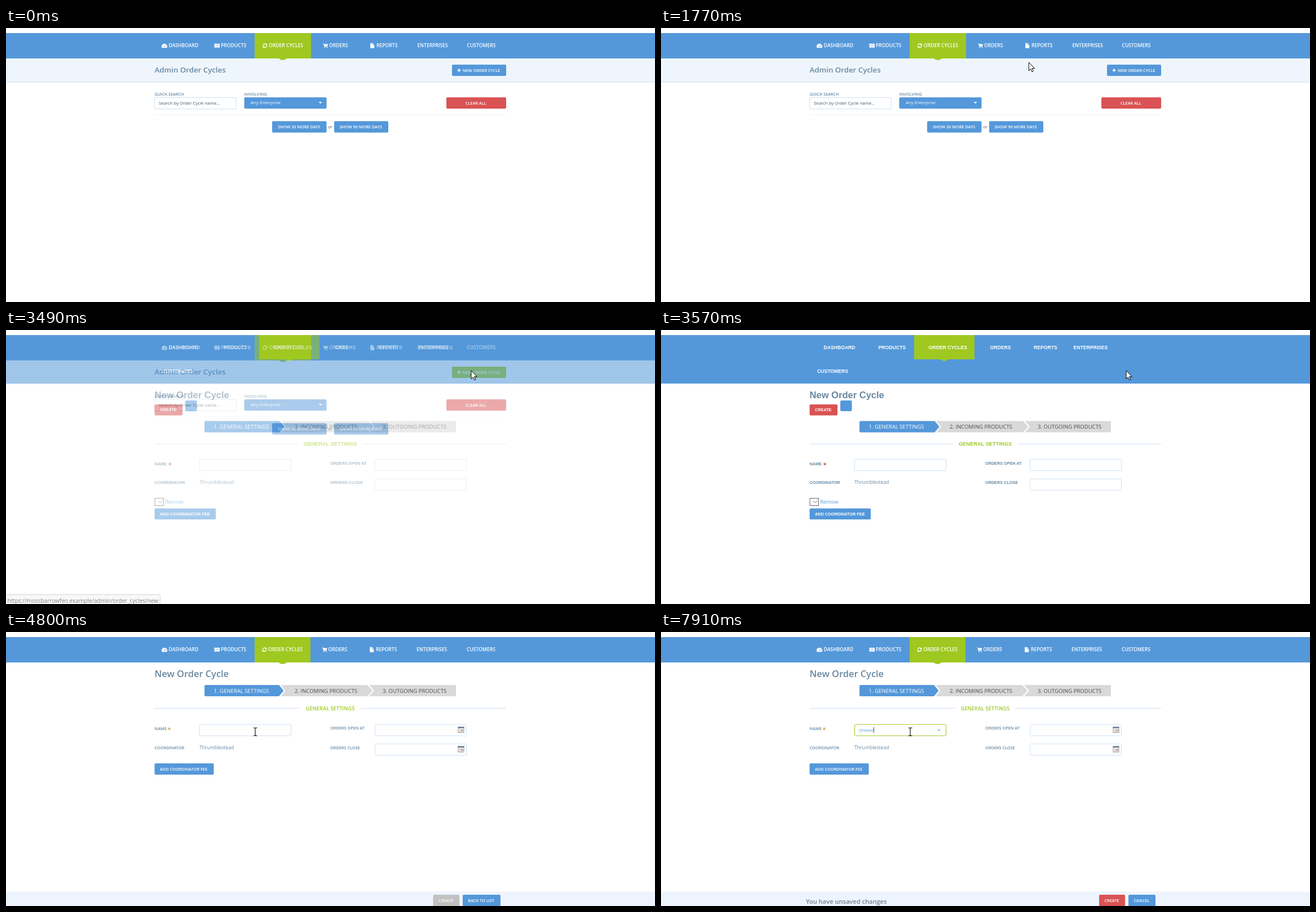
An HTML page for the animation above (7990 ms loop, 1151 by 486 pixels).

```html
<!DOCTYPE html>
<html lang="en">
<head>
<meta charset="utf-8">
<title>New order cycle</title>
<style>
  html, body { margin: 0; width: 100%; height: 100%; overflow: hidden; background: #fff; }
  svg { display: block; width: 100vw; height: 100vh; }
  text { white-space: pre; font-family: "Open Sans", "Noto Sans", sans-serif; }
  .alt { font-family: "Liberation Sans", Arial, sans-serif; }
</style>
</head>
<body>
<svg id="stage" viewBox="0 0 1151 486" xmlns="http://www.w3.org/2000/svg"></svg>
<script>
const LOOP = 7990;
const BLUE = '#5498da', GREEN = '#9fc820', RED = '#da5354', STEEL = '#6788a2';
const PALE = '#eff5fc', EDGE = '#cee1f4', INK = '#4a5560', GREY = '#d9d9d9';
const SITE = 'https://mossbarrowfen.example/admin/';

// drawing helpers
const rect = (x, y, w, h, fill, more = '') =>
  `<rect x="${x}" y="${y}" width="${w}" height="${h}" fill="${fill}" ${more}/>`;
const text = (x, y, str, size, fill, weight = 400, more = '') =>
  `<text x="${x}" y="${y}" font-size="${size}" fill="${fill}" font-weight="${weight}" ${more}>${str}</text>`;
const path = (d, fill = 'none', more = '') => `<path d="${d}" fill="${fill}" ${more}/>`;
const group = (id, body, more = '') => `<g id="${id}" ${more}>${body}</g>`;
const field = (x, y, w, id = '') =>
  rect(x + .5, y + .5, w - 1, 20, '#fff', `rx="1.5" stroke="${EDGE}" ${id && `id="${id}"`}`);
const button = (x, y, w, h, fill, tx, str, more = '') =>
  rect(x, y, w, h, fill, 'rx="2"') + text(tx, y + h / 2 + 2.7, str, 7.3, '#fff', more ? 700 : 600, more);
const ALT = 'class="alt"';
const page = rect(0, 0, 1151, 486, '#fff');

const ICONS = [
  path('M.6 8.5A5 5 0 1 1 9.4 8.5Z', '#fff') +
    path('M5 7L6.6 3.4M2 5.6h1M7.3 5.6h1', 'none', `stroke="${BLUE}"`),
  rect(0, 1, 9.5, 7, '#fff', 'rx=".6"') +
    path('M4.8 1V8M1 4.5H8.6', 'none', `stroke="${BLUE}" stroke-width=".7" stroke-dasharray="2 1"`),
  path('M.9 4A3.2 3.2 0 0 1 6.6 2.6M7.3 5A3.2 3.2 0 0 1 1.6 6.6', 'none', 'stroke="#fff" stroke-width="1.4"') +
    path('M8 .6V4H4.7ZM.2 8.5V5.2H3.5Z', '#fff'),
  path('M0 1.2H1.6L2.8 6.2H8.2', 'none', 'stroke="#fff" stroke-width="1"') +
    path('M2 1.8H9L8.2 5.3L2.8 5.8Z', '#fff') +
    '<circle cx="3.4" cy="8" r=".9" fill="#fff"/><circle cx="7.6" cy="8" r=".9" fill="#fff"/>',
  path('M.2 0H4V3.2H7.2V9H.2ZM4.7 0L7.2 2.5H4.7Z', '#fff')
];
const ITEMS = ['DASHBOARD', 'PRODUCTS', 'ORDER CYCLES', 'ORDERS', 'REPORTS', 'ENTERPRISES', 'CUSTOMERS'];

const active = (x, w, h) =>
  rect(x, 9, w, h, GREEN) + `<circle cx="${x + w / 2}" cy="${h + 2}" r="10" fill="${GREEN}"/>`;
const labels = xs => xs.map((x, i) => text(x, 34.2, ITEMS[i], 8.6, '#fff', 600)).join('');
const icons = xs => xs.map((x, i) => `<g transform="translate(${x} 26.7)">${ICONS[i]}</g>`).join('');

function tabs(y, shift) {
  const a = 484 + shift, b = 641.5 + shift, m = y + 10, e = y + 20;
  const gap = (x, w) => path(`M${x} ${y - 1}L${x + w} ${m}L${x} ${e + 1}`, 'none', 'stroke="#fff" stroke-width="2.2"');
  return rect(352, y, 446, 20, GREY, 'rx="2"') +
    path(`M354 ${y}H${a}L${a + 9} ${m}L${a} ${e}H354Q352 ${e} 352 ${e - 2}V${y + 2}Q352 ${y} 354 ${y}Z`, BLUE) +
    gap(a + 1, 9) + gap(b, 10) +
    text(368.5, y + 13.5, '1. GENERAL SETTINGS', 9.55, '#fff') +
    text(512, y + 13.5, '2. INCOMING PRODUCTS', 9.55, '#4d4d4d') +
    text(668, y + 13.5, '3. OUTGOING PRODUCTS', 9.55, '#4d4d4d');
}
const legend = (y, x0, x1, size, weight, more = '') =>
  path(`M263.5 ${y}H${x0}M${x1} ${y}H887`, 'none', `stroke="${EDGE}"`) +
  text(575, y + 3.3, 'GENERAL SETTINGS', size, GREEN, weight, `text-anchor="middle" ${more}`);

const listPage = page +
  rect(0, 9, 1151, 45, BLUE) + rect(0, 54, 1151, 42, PALE) + rect(0, 95.5, 1151, 1, EDGE) +
  active(441, 100, 45) + rect(541, 9, 87, 45, GREEN, 'id="ordersHover"') +
  icons([276, 369.5, 455, 562, 646]) + labels([288.5, 381, 466, 573, 657, 729.5, 817.5]) +
  text(263.5, 79.4, 'Admin Order Cycles', 13.28, STEEL, 600) +
  rect(791, 65, 96, 20, BLUE, 'rx="2" id="newButton"') +
  path('M800.5 75H806.5M803.5 72V78', 'none', 'stroke="#fff" stroke-width="1.7"') +
  text(810, 77.7, 'NEW ORDER CYCLE', 7.3, '#fff', 600) +
  text(263.5, 120.2, 'QUICK SEARCH', 7.25, STEEL, 600) +
  text(422.5, 120.2, 'INVOLVING', 7.35, STEEL, 600) +
  field(263, 123, 146) + text(271, 135.9, 'Search by Order Cycle name...', 7.8, INK) +
  rect(422.5, 123, 146, 20, BLUE, 'rx="2"') + text(434, 135.4, 'Any Enterprise', 7.8, '#fff') +
  path('M554.7 131H560.5L557.6 134.2Z', '#fff') +
  button(781, 123, 106, 20, RED, 815, 'CLEAR ALL') +
  rect(263.5, 153.5, 623.5, 1, '#f1f3f5') +
  button(472, 165.2, 96.5, 20.3, BLUE, 482, 'SHOW 30 MORE DAYS') +
  button(582, 165.2, 96, 20.3, BLUE, 591.5, 'SHOW 90 MORE DAYS') +
  text(571, 177.6, 'or', 7.8, INK) +
  group('status',
    rect(-2, 469.5, 254, 20, '#f2f2f2', 'id="statusBox" stroke="#b9b9b9" style="filter:drop-shadow(0 0 1px #bbb)"') +
    text(2.5, 484, '', 10, '#000', 400, 'id="statusText"'));

const altNav = [[288.5, 33.6], [385.5, 33.6], [474.5, 33.6], [583.5, 33.6], [661, 33.6], [731.5, 33.6], [277, 76]];
const altLabel = (x, y, str) => text(x, y, str, 7.25, STEEL, 700, ALT);
const plainPage = page + rect(0, 9, 1151, 86, BLUE) + active(449, 107, 43) +
  altNav.map(([x, y], i) => text(x, y, ITEMS[i], 8.65, '#fff', 700, ALT)).join('') +
  text(263.5, 121, 'New Order Cycle', 16.55, STEEL, 700, ALT) +
  button(263.5, 132, 49.5, 19.5, RED, 273, 'CREATE', ALT) +
  rect(318, 125, 20.5, 19, BLUE, 'rx="2"') +
  tabs(161.5, 1.3) + legend(202, 518, 632, 9.29, 700, ALT) +
  altLabel(263.5, 239.6, 'NAME') + text(287.5, 242.5, '*', 11, RED, 700) +
  altLabel(575, 238.8, 'ORDERS OPEN AT') + altLabel(263.5, 273, 'COORDINATOR') + altLabel(575, 273, 'ORDERS CLOSE') +
  field(343, 229, 163) + field(654, 229, 163) + field(654, 263.5, 163) +
  text(343, 273.2, 'Thrumblestead', 8.63, STEEL) +
  rect(264, 298.5, 15.5, 13, '#fff', 'stroke="#666"') +
  path('M270 303L273.5 306.5L277 303', 'none', 'stroke="#555" stroke-width=".9"') +
  text(282.5, 308.4, 'Remove', 8.63, BLUE) +
  button(263.5, 316.5, 108.5, 19.5, BLUE, 273, 'ADD COORDINATOR FEE', ALT);

const label = (x, y, str) => text(x, y, str, 7.3, STEEL, 600);
const calendar = y => `<g transform="translate(801.5 ${y})">` +
  rect(.5, .5, 10, 10, '#f4f4f4', 'stroke="#999"') + rect(0, 0, 11, 2.6, '#6f7f96') +
  path('M2 5H9M2 7H9M2 9H6', 'none', 'stroke="#c4c4cc"') + rect(6, 5.5, 3, 3, '#c98f82') + '</g>';

const formPage = page + rect(0, 9, 1151, 45, BLUE) + active(441, 99, 45) +
  icons([276, 369.5, 454.3, 560.5, 645]) + labels([288.5, 381, 465, 571.5, 656, 728, 817]) +
  text(263.5, 80, 'New Order Cycle', 16.4, STEEL, 600) +
  tabs(94, 0) + legend(135.3, 521.5, 628.5, 9.25, 600) +
  label(263.5, 173.8, 'NAME') + text(286.5, 177, '*', 11, '#cda01c', 600) +
  label(575, 173.4, 'ORDERS OPEN AT') + label(263.5, 207.7, 'COORDINATOR') + label(575, 207.7, 'ORDERS CLOSE') +
  field(343, 163.5, 163, 'nameField') + field(654, 163.5, 163) + field(654, 198, 163) +
  calendar(168) + calendar(202.5) +
  text(343, 208, 'Thrumblestead', 8.63, STEEL) +
  button(263.5, 233, 105, 20, BLUE, 273, 'ADD COORDINATOR FEE') +
  rect(0, 460.5, 1151, 26, '#edf4fd') +
  group('saved',
    button(757.5, 466, 46.5, 21, '#c1c1c1', 767.5, 'CREATE') +
    button(810, 466, 67, 21, BLUE, 819.5, 'BACK TO LIST')) +
  group('unsaved',
    rect(750, 461, 130, 25, '#edf4fd') +
    text(257, 481.6, 'You have unsaved changes', 11.1, '#747d87', 600) +
    button(777, 466, 46, 21, RED, 786.5, 'CREATE') +
    button(829, 466, 48, 21, BLUE, 838.5, 'CANCEL') +
    path('M490.6 171.8L495 176.2M495 171.8L490.6 176.2', 'none', `stroke="${BLUE}" stroke-width=".8"`)) +
  text(351, 177.2, '', 7.8, BLUE, 400, 'id="typed"') +
  rect(351, 169, .9, 10, '#222', 'id="caret"') +
  group('tip', rect(383.5, 128.5, 114.5, 29, '#f2f2f2', 'stroke="#bdbdbd"') +
    text(390, 147.6, 'This is a required field', 10, '#111'));

const line = 'stroke="#000" stroke-linejoin="round"';
const pointer =
  group('arrow', path('M0 0V14.8L3.4 11.6L5.7 16.8L8 15.8L5.7 10.7H10.2Z', '#fff', line)) +
  group('hand', path('M-1.6 11.5V1.8A1.6 1.6 0 0 1 1.6 1.8V7A1.5 1.5 0 0 1 4.5 7.4A1.5 1.5 0 0 1 7.2 8' +
    'A1.3 1.3 0 0 1 9.4 9.1V13C9.4 15 8 16 8 17.5V19.5H-.2V18C-1.5 16.5-3 14-4.6 11.6C-5.5 10.3-4 8.9-2.7 9.9Z', '#fff', line) +
    path('M1.6 7V10.5M4.5 7.6V10.5M7.2 8.4V10.8', 'none', line)) +
  group('beam', path('M-3-7H-1L0-6L1-7H3.5M0-6V6M-3 7H-1L0 6L1 7H3.5', 'none', 'stroke="#000" stroke-width="1.1"'));

document.getElementById('stage').innerHTML =
  group('list', listPage) + group('plain', plainPage) + group('form', formPage) +
  '<circle id="click" r="11" fill="#f6e600" fill-opacity=".6"/>' + group('pointer', pointer);

const el = {};
document.querySelectorAll('[id]').forEach(e => el[e.id] = e);
const fade = (id, v) => { el[id].style.opacity = v; };
const show = (id, on) => { el[id].style.display = on ? '' : 'none'; };

// progress 0..1 in n equal jumps, the first at a and the last at b
const steps = (t, a, b, n) =>
  Math.max(0, Math.min(n, Math.floor((t - a) / (b - a) * (n - 1) + 1e-6) + 1)) / n;

// pointer moves: start, end, jumps, x, y
const MOVES = [
  [300, 920, 9, 483, 20],
  [1390, 1627, 4, 590, 57],
  [1706, 2180, 7, 825, 72],
  [3720, 4490, 11, 445, 168],
  [4560, 4800, 4, 442, 177]
];
const TYPED = [[6130, 'O'], [6370, 'Or'], [6530, 'Ord'], [6760, 'Orde'], [6830, 'Ordee'], [6990, 'Ordeer']];
// link areas: left, top, right, bottom, address
const LINKS = [
  [441, 9, 541, 54, 'order_cycles'],
  [541, 9, 628, 54, 'orders'],
  [791, 65, 887, 85, 'order_cycles/new']
];

function pointerAt(t) {
  let x = 718, y = 440;
  for (const [a, b, n, tx, ty] of MOVES) {
    const p = steps(t, a, b, n), e = p * (2 - p);
    x += (tx - x) * e;
    y += (ty - y) * e;
  }
  return [x, y];
}

function caretAt(t) {
  if (t < 5120) return 0;
  if (t < 6060) return 1 - steps(t, 5510, 5660, 3);
  return t < 7910 ? 1 - steps(t, 7370, 7530, 3) : 1;
}

function draw(t) {
  const [x, y] = pointerAt(t);
  const inside = ([l, u, r, d]) => x >= l && x <= r && y >= u && y <= d;
  const link = t >= 300 && t < 3340 && LINKS.find(inside);
  const onField = t > 4000 && inside([343, 163, 506, 185]);

  show('pointer', t >= 300);
  el.pointer.setAttribute('transform', `translate(${x} ${y})`);
  show('hand', link);
  show('beam', onField);
  show('arrow', !link && !onField);

  const pressed = (t >= 2710 && t < 2940) || (t >= 5120 && t < 5340);
  show('click', pressed);
  el.click.setAttribute('cx', x - 1);
  el.click.setAttribute('cy', y);

  const url = link ? link[4] : t >= 3340 ? 'order_cycles/new' : '';
  show('status', url);
  show('ordersHover', url === 'orders');
  el.newButton.setAttribute('fill', url.endsWith('new') ? GREEN : BLUE);
  if (url) {
    el.statusText.textContent = SITE + url;
    el.statusBox.setAttribute('width', el.statusText.getComputedTextLength() + 7.5);
  }

  fade('plain', steps(t, 3340, 3570, 4));
  fade('form', steps(t, 3720, 3950, 4));

  const changed = steps(t, 6130, 6220, 2);
  fade('unsaved', changed);
  fade('saved', 1 - changed);
  fade('tip', steps(t, 5510, 5660, 3) * (1 - changed));

  const word = TYPED.reduce((s, [at, str]) => t >= at ? str : s, '');
  el.typed.textContent = word;
  el.caret.setAttribute('x', 351 + (word ? el.typed.getComputedTextLength() : 0));
  fade('caret', caretAt(t));
  el.nameField.setAttribute('stroke', t >= 5120 ? GREEN : EDGE);
}

const start = performance.now();
function frame() {
  draw((performance.now() - start) % LOOP);
  requestAnimationFrame(frame);
}
frame();
</script>
</body>
</html>
```
